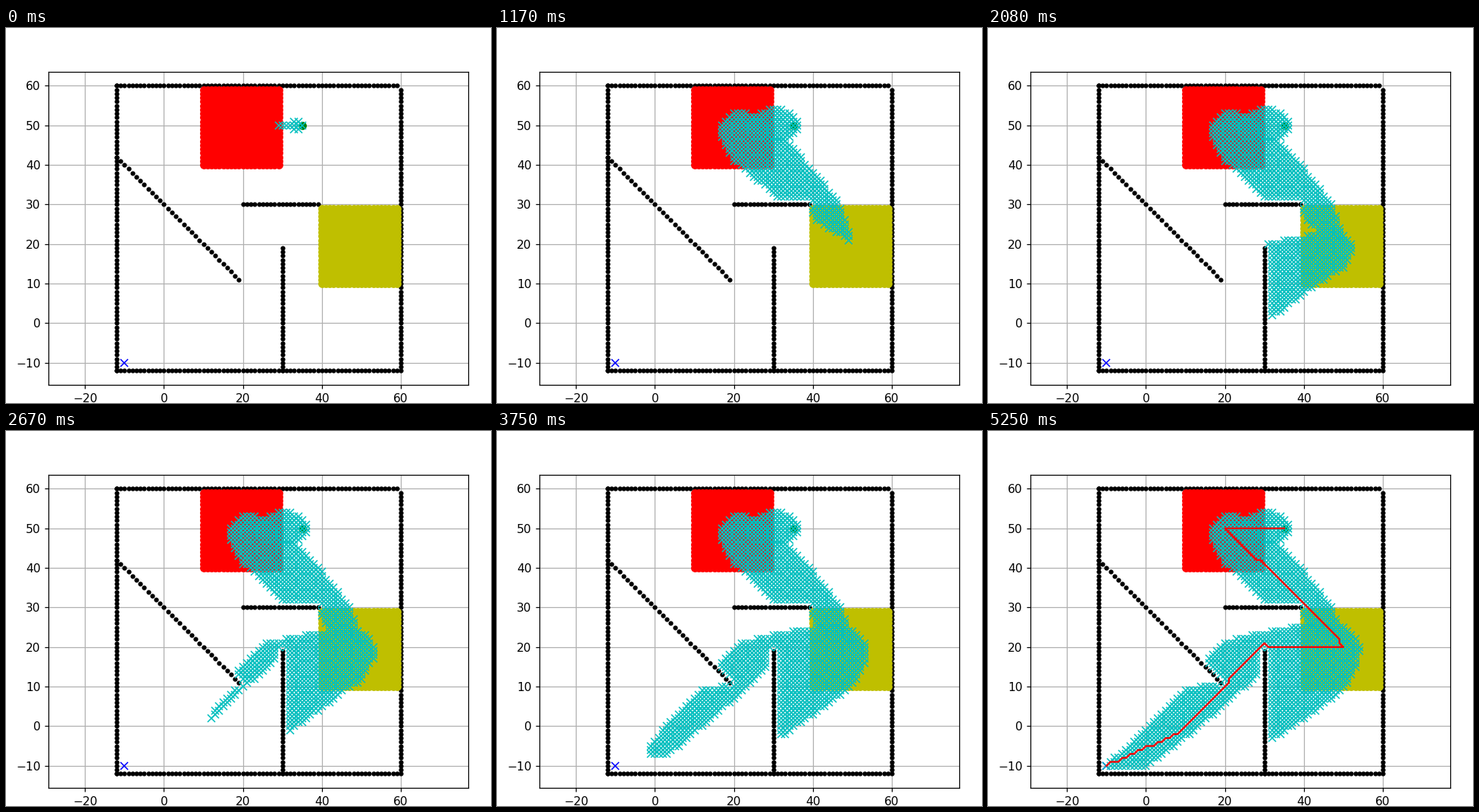
A matplotlib script for the animation above (5.33 s loop, 640 px wide and 496 px high).

```python
import math

import numpy as np
import matplotlib.pyplot as plt
from matplotlib.animation import FuncAnimation

W, H, DPI = 640, 496, 100
FRAMES, LOOP_MS = 64, 5330
ZOOM = 1.115  # all point sizes, relative to matplotlib's defaults

plt.rcParams.update({
    "font.family": "DejaVu Sans",
    "font.size": 10 * ZOOM,
    "lines.linewidth": 1.5 * ZOOM,
    "lines.markersize": 6 * ZOOM,
    "lines.markeredgewidth": 1.0 * ZOOM,
    "axes.linewidth": 0.8 * ZOOM,
    "grid.linewidth": 0.8 * ZOOM,
})
for axis in ("xtick", "ytick"):
    plt.rcParams[axis + ".major.size"] = 3.5 * ZOOM
    plt.rcParams[axis + ".major.width"] = 0.8 * ZOOM
    plt.rcParams[axis + ".major.pad"] = 3.5 * ZOOM

# ---- map -------------------------------------------------------------
LO, HI = -12, 60
side = range(LO, HI)
walls = [(i, LO) for i in side] + [(HI, i) for i in side]
walls += [(i, HI) for i in side] + [(LO, i) for i in range(LO, HI + 1)]
walls += [(i, 30 - i) for i in range(LO, 20)]
walls += [(i, 30) for i in range(20, 40)]
walls += [(30, i) for i in range(LO, 20)]

slow_area = [(x, y) for x in range(10, 30) for y in range(40, 60)]
fuel_area = [(x, y) for x in range(40, 60) for y in range(10, 30)]
extra = {**dict.fromkeys(slow_area, 0.3), **dict.fromkeys(fuel_area, 0.15)}

# cells within one unit of a wall cannot be entered
blocked = {(x + dx, y + dy) for x, y in walls
           for dx, dy in ((0, 0), (1, 0), (-1, 0), (0, 1), (0, -1))}

DIAG = math.sqrt(2)
MOVES = [(1, 0, 1), (0, 1, 1), (-1, 0, 1), (0, -1, 1),
         (-1, -1, DIAG), (-1, 1, DIAG), (1, -1, DIAG), (1, 1, DIAG)]

STOPS = [(35, 50), (20, 50), (50, 20), (-10, -10)]


def search(start, goal):
    """A* on the grid; returns cells in order of expansion and the path."""
    def score(cell):
        return frontier[cell][0] + math.hypot(goal[0] - cell[0],
                                              goal[1] - cell[1])

    frontier, parents, order = {start: (0.0, None)}, {}, []
    while frontier:
        cell = min(frontier, key=score)
        cost, parent = frontier.pop(cell)
        parents[cell] = parent
        order.append(cell)
        if cell == goal:
            break
        for dx, dy, step in MOVES:
            nxt = (cell[0] + dx, cell[1] + dy)
            if nxt in parents or nxt in blocked:
                continue
            new = cost + step
            if nxt in extra:
                new += extra[nxt] * step
            if nxt not in frontier or frontier[nxt][0] > new:
                frontier[nxt] = (new, cell)
    path, cell = [], goal
    while cell is not None:
        path.append(cell)
        cell = parents[cell]
    return order, path[::-1]


legs, offsets, cells, route, pauses = [], [], [], [], []
for a, b in zip(STOPS, STOPS[1:]):
    order, path = search(a, b)
    offsets.append(len(cells))
    pauses += [len(cells) + i + 1 for i in range(0, len(order), 10)]
    legs.append(order)
    cells += order
    route += path
cells, route = np.array(cells), np.array(route)


# ---- timing ----------------------------------------------------------
def reached(leg, cell):
    """First redraw that shows the given cell of a leg."""
    count = offsets[leg] + legs[leg].index(cell) + 1
    return int(np.searchsorted(pauses, count))


key_times = [0, 8, 14, 24, 38, 51]
key_steps = [1, reached(1, (43, 28)), reached(1, (49, 21)),
             reached(2, (35, 21)), reached(2, (5, -5)), reached(2, (-3, -4))]
last = len(pauses) - 1
pace = 0.8 * (key_steps[-1] - key_steps[-2]) / (key_times[-1] - key_times[-2])
done = min(FRAMES - 2,
           key_times[-1] + math.ceil((last + 1 - key_steps[-1]) / pace))
key_times.append(done)
key_steps.append(last)

# ---- figure ----------------------------------------------------------
fig = plt.figure(figsize=(W / DPI, H / DPI), dpi=DPI, facecolor="white")
left, right, top, bottom = 56.4, 610.3, 57.6, 472.1
ax = fig.add_axes([left / W, 1 - bottom / H,
                   (right - left) / W, (bottom - top) / H])
ax.set_xlim(-29.2, 77.14)
ax.set_ylim(-15.6, 63.6)
ax.set_xticks(range(-20, 61, 20))
ax.set_yticks(range(-10, 61, 10))
ax.grid(True)

ax.plot(*zip(*walls), ".k")
ax.plot(*STOPS[0], "og")
ax.plot(*STOPS[-1], "xb")
ax.plot(*zip(*fuel_area), "oy")
ax.plot(*zip(*slow_area), "or")
crosses, = ax.plot([], [], "xc")
line, = ax.plot(route[:, 0], route[:, 1], "-r", visible=False)


def draw(frame):
    finished = frame >= done
    step = int(round(np.interp(frame, key_times, key_steps)))
    shown = cells if finished else cells[:pauses[step]]
    crosses.set_data(shown[:, 0], shown[:, 1])
    line.set_visible(finished)
    return crosses, line


anim = FuncAnimation(fig, draw, frames=FRAMES, init_func=lambda: draw(0),
                     interval=LOOP_MS / FRAMES, repeat=True, repeat_delay=0)
plt.show()
```
